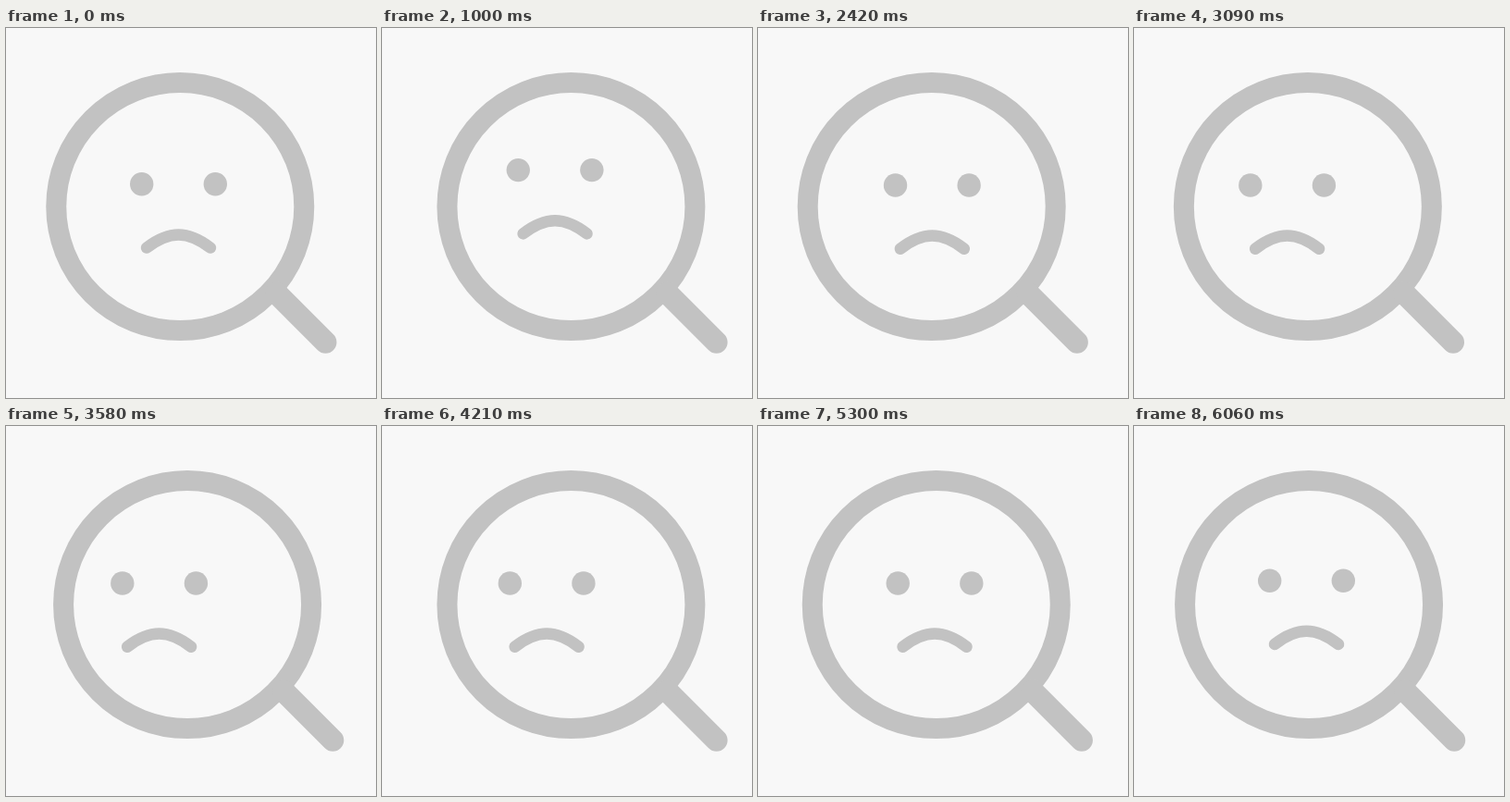
Write an HTML page with a canvas that moves like this. It is 400 px wide and 400 px high and loops after 6090 ms.

```html
<!DOCTYPE html>
<html lang="en">
<head>
<meta charset="utf-8">
<title>Nothing found</title>
<style>
html, body { margin: 0; width: 100%; height: 100%; overflow: hidden; background: #f8f8f8; }
canvas { display: block; width: 400px; height: 400px; }
</style>
</head>
<body>
<canvas id="stage" width="400" height="400"></canvas>
<script>
const LOOP = 6090;
const PERIOD = 6000; // one search gesture
const LEAD = 100;    // the loop opens this far into the gesture
const PAPER = '#f8f8f8';
const INK = '#c2c2c2';
const ctx = document.getElementById('stage').getContext('2d');

const LEFT = 187.7, RIGHT = 204.4;  // lens
const CENTRE = 186.5, LOW = 170;    // resting face

const ease = t => t * t * (3 - 2 * t);
const clamp = t => Math.min(1, Math.max(0, t));

// Each move is [start, end, destination] and sets off from the one before.
function follow(time, rest, moves) {
  return moves.reduce(
    (pos, [start, end, to]) => pos + (to - pos) * ease(clamp((time - start) / (end - start))),
    rest
  );
}

const lensX = time => follow(time, LEFT, [
  [0, 920, RIGHT], [1220, 2320, LEFT], [3130, 4230, RIGHT], [4655, 5830, LEFT]
]);
const faceX = time => follow(time, CENTRE, [
  [1020, 1870, 208], [1950, 3150, 165.6], [3800, 4960, 196], [5040, 5740, CENTRE]
]);
const faceY = time => follow(time, LOW, [[0, 620, 153.3], [1020, 2015, LOW]]);

function stroke(width, trace) {
  ctx.lineWidth = width;
  ctx.beginPath();
  trace();
  ctx.stroke();
}

function drawLens(x) {
  ctx.save();
  ctx.translate(x, 193.1);
  stroke(22, () => ctx.arc(0, 0, 134, 0, Math.PI * 2));
  stroke(24, () => {
    ctx.moveTo(104, 93.4);
    ctx.lineTo(157.2, 146.6);
  });
  ctx.restore();
}

function drawFace(x, y) {
  ctx.save();
  ctx.translate(x, y);
  for (const side of [-39.8, 39.8]) {
    ctx.beginPath();
    ctx.arc(side, 0, 12.7, 0, Math.PI * 2);
    ctx.fill();
  }
  stroke(12.5, () => {
    ctx.moveTo(-34.5, 68.8);
    ctx.bezierCurveTo(-24.5, 61, -13, 54.6, 0, 54.6);
    ctx.bezierCurveTo(13, 54.6, 24.5, 61, 34.5, 68.8);
  });
  ctx.restore();
}

function render(time) {
  const phase = (time + LEAD) % PERIOD;
  ctx.fillStyle = PAPER;
  ctx.fillRect(0, 0, 400, 400);
  ctx.fillStyle = ctx.strokeStyle = INK;
  ctx.lineCap = 'round';
  drawLens(lensX(phase));
  drawFace(faceX(phase), faceY(phase));
}

const start = performance.now();
function tick() {
  render((performance.now() - start) % LOOP);
  requestAnimationFrame(tick);
}
tick();
</script>
</body>
</html>
```
